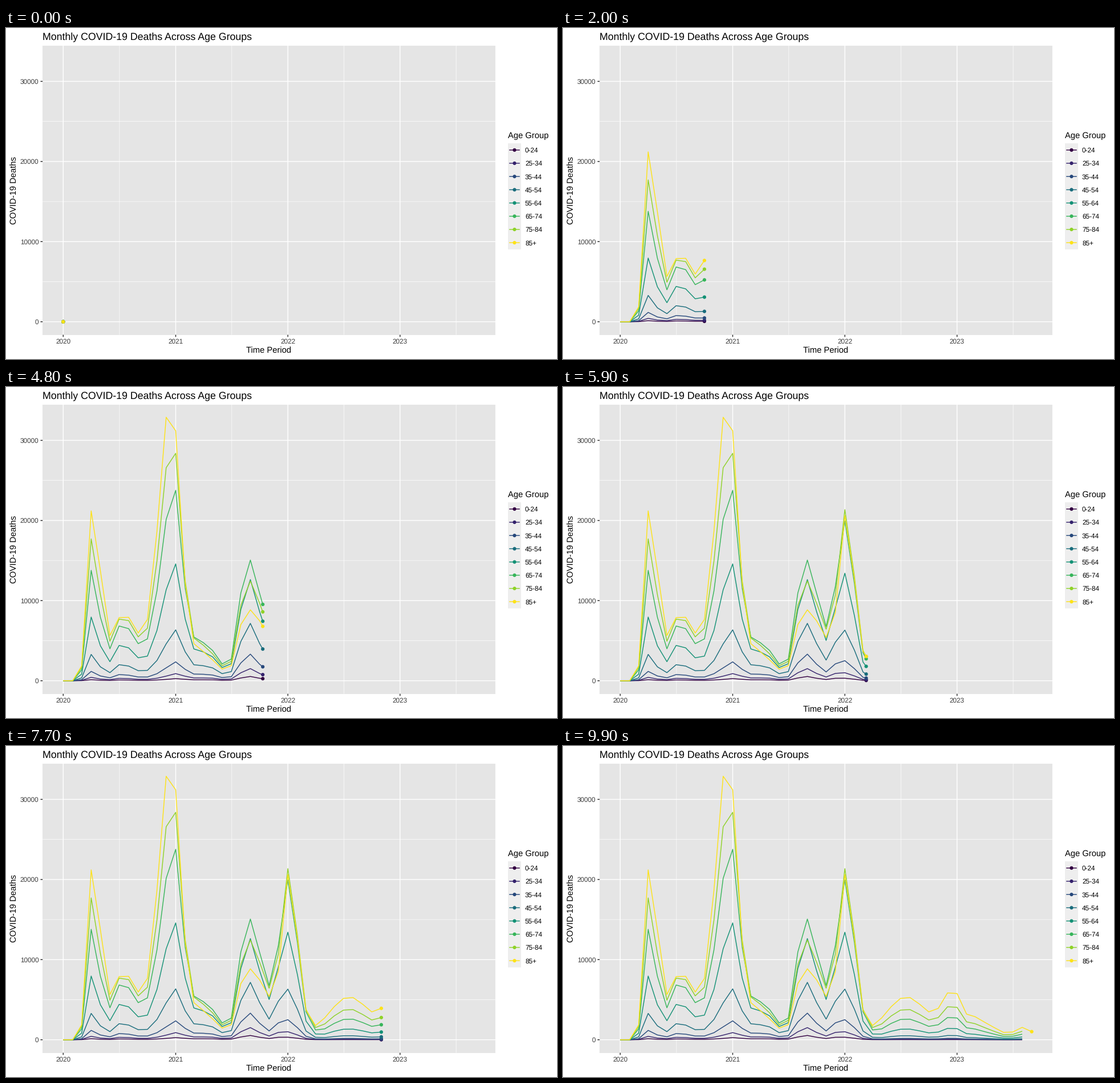
Recreate the animation shown at these times as a matplotlib script. Size 966 by 580 pixels, loop 10000 ms.

```python
import numpy as np
import matplotlib.pyplot as plt
from matplotlib.animation import FuncAnimation
from matplotlib.patches import Circle, Rectangle

W, H, DPI = 966, 580, 96
FRAMES, INTERVAL = 100, 100
LEFT, RIGHT, TOP, BOTTOM = 64.2, 857.9, 31, 537.6
X0, PX_PER_DAY = 100.3, 0.5388
Y0, PX_PER_DEATH = 514.7, 0.01404
LINE = 1.42 * 72 / DPI
RADIUS = 3.1

plt.rcParams.update({"font.family": "Liberation Sans", "text.hinting": "none"})

months = np.arange("2020-01", "2023-10", dtype="datetime64[M]")
days = (months.astype("datetime64[D]") - np.datetime64("2020-01-01")).astype(int)
keys = np.round(days / days[-1] * (FRAMES - 1))
t = np.arange(len(months))


def wave(peak, height, rise, fall):
    """Bell curve with its own width on each side of the peak month."""
    width = np.where(t < peak, rise, fall)
    return height * np.exp(-((t - peak) / width) ** 2)


# Waves of deaths in the oldest group
oldest = (wave(3, 21200, 0.64, 1.5) + wave(6.4, 8400, 1.18, 2.24)
          + wave(11.5, 35300, 1.83, 1.41) + wave(14.5, 3700, 1.2, 2.53)
          + wave(19.6, 8950, 1.16, 3.3) + wave(24, 19050, 0.89, 1.45)
          + wave(30.6, 5350, 3.15, 3.16) + wave(35.6, 5800, 1.64, 1.67)
          + wave(38.2, 2250, 0.8, 2.9) + wave(43, 1400, 1.04, 1.65))

# How far deaths shift towards younger people, by month
tilt = np.interp(t, *zip((2, .12), (4, -.12), (6, .29), (8, .18), (10, -.08),
                         (11, -.06), (14, .6), (16, .81), (18, .8), (20, .97),
                         (22, .66), (23, .76), (24, .4), (26, .38), (28, -.27),
                         (44, -.38)))

names = ["0-24", "25-34", "35-44", "45-54", "55-64", "65-74", "75-84", "85+"]
shares = [.0058, .02, .055, .155, .375, .65, .835, 1]
colors = plt.cm.viridis(np.linspace(0, 1, len(names)))[:, :3] ** 1.23


def deaths(i):
    """Monthly deaths of group i; only the oldest has the last month."""
    youth = 3.5 * (1 - np.exp((i + 1 - len(names)) / 6))
    values = shares[i] * oldest * np.exp(tilt * youth)
    return values if i == len(names) - 1 else values[:-1]


def px(day):
    return X0 + PX_PER_DAY * np.asarray(day)


def py(count):
    return Y0 - PX_PER_DEATH * np.asarray(count)


fig = plt.figure(figsize=(W / DPI, H / DPI), dpi=DPI, facecolor="white")
ax = fig.add_axes([0, 0, 1, 1])
ax.set(xlim=(0, W), ylim=(H, 0))
ax.axis("off")


def box(x, y, w, h, color):
    ax.add_patch(Rectangle((x, y), w, h, fc=color, lw=0, zorder=0))


def stroke(xs, ys, color, lw=LINE, z=1):
    return ax.plot(xs, ys, color=color, lw=lw, zorder=z, snap=False,
                   solid_capstyle="butt", solid_joinstyle="round")[0]


def dot(x, y, color, z=4):
    return ax.add_patch(Circle((x, y), RADIUS, fc=color, lw=0, zorder=z))


def label(x, y, text, size, color="black", **kw):
    ax.text(x, y, text, size=size, color=color, va="baseline", **kw)


TITLE, HEAD, SMALL = 13.28, 11.07, 8.85
TICK, TICK_TEXT = "#242424", "#3d3d3d"

# Panel, grid and axes
box(LEFT, TOP, RIGHT - LEFT, BOTTOM - TOP, "#e5e5e5")
for v in range(5000, 30000, 10000):
    stroke([LEFT, RIGHT], [py(v)] * 2, "white", LINE / 2)
for d in (183, 548.5, 913.5, 1278.5):
    stroke([px(d)] * 2, [TOP, BOTTOM], "white", LINE / 2)
for v in range(0, 40000, 10000):
    stroke([LEFT, RIGHT], [py(v)] * 2, "white")
    stroke([LEFT - 3.7, LEFT], [py(v)] * 2, TICK)
    label(57.4, py(v) + 4.2, str(v), SMALL, TICK_TEXT, ha="right")
for year, d in zip(range(2020, 2024), days[::12]):
    stroke([px(d)] * 2, [TOP, BOTTOM], "white")
    stroke([px(d)] * 2, [BOTTOM, BOTTOM + 3.7], TICK)
    label(px(d), 553, str(year), SMALL, TICK_TEXT, ha="center")

label(64, 20.3, "Monthly COVID-19 Deaths Across Age Groups", TITLE)
label((LEFT + RIGHT) / 2 - 0.4, 570.2, "Time Period", HEAD, ha="center")
label(19, (TOP + BOTTOM) / 2, "COVID-19 Deaths", HEAD, ha="center",
      rotation=90, rotation_mode="anchor")

# Legend
KEY, KEY_X, KEY_Y = 23.2, 879.9, 202.2
label(879.5, 193.3, "Age Group", HEAD)
box(KEY_X, KEY_Y, KEY, KEY * len(names), "#eeeeee")
for i, (name, color) in enumerate(zip(names, colors)):
    y = KEY_Y + KEY * (i + 0.5)
    stroke([KEY_X + 0.1 * KEY, KEY_X + 0.9 * KEY], [y, y], color, z=2)
    dot(KEY_X + KEY / 2, y, color)
    label(910, y + 4.2, name, SMALL)

series = []
for i, color in enumerate(colors):
    values = deaths(i)
    n = len(values)
    series.append((keys[:n], px(days[:n]), py(values),
                   stroke([], [], color, z=3), dot(X0, Y0, color, z=5)))


def update(frame):
    for key, xs, ys, line, point in series:
        x, y = np.interp(frame, key, xs), np.interp(frame, key, ys)
        past = key < frame
        line.set_data(np.append(xs[past], x), np.append(ys[past], y))
        point.set_center((x, y))
        point.set_visible(frame <= key[-1])
    return []


anim = FuncAnimation(fig, update, frames=FRAMES, interval=INTERVAL,
                     repeat=True, repeat_delay=0, blit=False)
plt.show()
```
